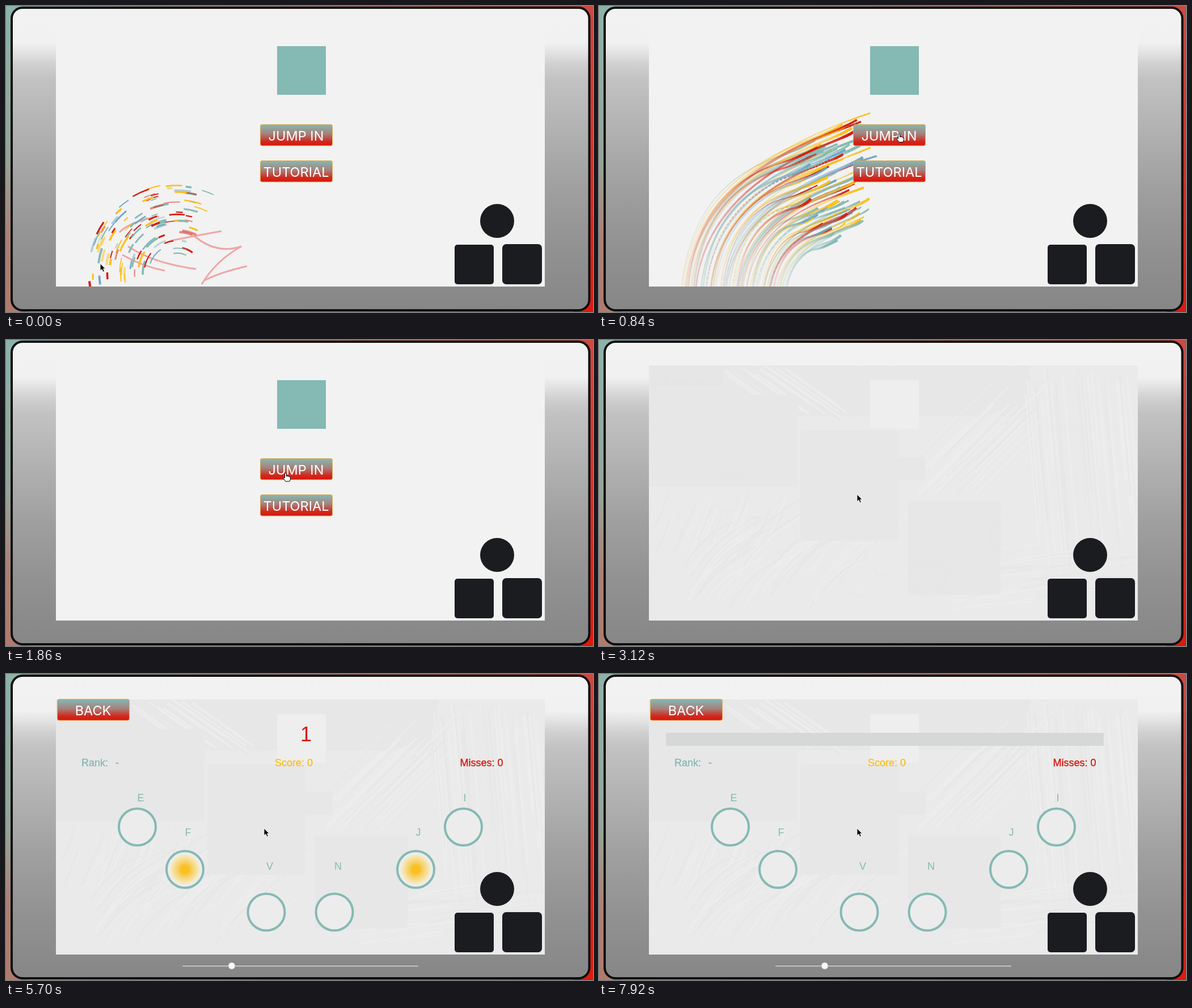
Recreate the animation shown at these times as an HTML page with a canvas. Size 1035 by 541 pixels, loop 8 s.

```html
<!DOCTYPE html>
<html lang="en">
<head>
<meta charset="utf-8">
<title>Rhythm game</title>
<style>
html, body { margin: 0; width: 100%; height: 100%; overflow: hidden; background: #888; }
canvas, svg { position: absolute; left: 0; top: 0; width: 1035px; height: 541px; display: block; }
text { font-family: "Liberation Sans", Arial, sans-serif; font-size: 18px; white-space: pre; }
.btn text { font-family: Inter, "Open Sans", sans-serif; font-size: 23.5px; fill: #fff; text-anchor: middle; }
.key { fill: #85b9b3; text-anchor: middle; }
.stat { stroke-width: .4px; }
#count { font-size: 36px; fill: #d41c10; text-anchor: middle; }
</style>
</head>
<body>
<canvas id="stage" width="1035" height="541"></canvas>
<svg viewBox="0 0 1035 541">
  <defs>
    <linearGradient id="btnFill" x1="0" y1="0" x2="0" y2="1">
      <stop offset="0" stop-color="#85b9b3"/>
      <stop offset=".45" stop-color="#a7807a"/>
      <stop offset=".8" stop-color="#d0281d"/>
      <stop offset="1" stop-color="#dc1608"/>
    </linearGradient>
    <radialGradient id="glowFill">
      <stop offset=".28" stop-color="#fbc01b"/>
      <stop offset=".36" stop-color="#f6c84a"/>
      <stop offset=".7" stop-color="#f6dd8e"/>
      <stop offset=".95" stop-color="#f5ebc8"/>
      <stop offset="1" stop-color="#f3eede" stop-opacity=".6"/>
    </radialGradient>
  </defs>
  <g id="menu">
    <rect x="478" y="71" width="86" height="86" fill="#85b9b3"/>
  </g>
  <g id="game">
    <rect id="bar" x="118" y="104" width="772" height="23" fill="#d6d8d7"/>
    <text class="stat" x="133" y="163" fill="#85b9b3" stroke="#85b9b3">Rank:</text>
    <text class="stat" x="193" y="163" fill="#85b9b3" stroke="#85b9b3">-</text>
    <text class="stat" x="474" y="163" fill="#fbc01b" stroke="#fbc01b">Score: 0</text>
    <text class="stat" x="800.5" y="163" fill="#d41c10" stroke="#d41c10">Misses: 0</text>
    <text id="count" x="529" y="118.5"></text>
    <rect x="311" y="514.5" width="416" height="3" rx="1.5" fill="#bcbcbc"/>
    <rect x="311" y="514" width="416" height="1" fill="#7b7b7b"/>
    <circle cx="398" cy="516" r="6" fill="#f8f8f8" stroke="#a5a5a5" stroke-width=".6"/>
  </g>
  <g fill="#1b1c1f">
    <circle cx="866" cy="380" r="30"/>
    <rect x="791" y="422" width="69" height="70" rx="5"/>
    <rect x="875" y="421" width="70" height="71" rx="7"/>
  </g>
  <g id="cursor">
    <path id="arrow" d="M0 0V12.5L3 9.8L5 14.5L7.3 13.5L5.3 9H9Z" fill="#000" stroke="#fff" stroke-width=".8"/>
    <path id="hand" d="M-1.5 1Q0-1 1.5 1V6Q3 4.5 4 6Q6 5 6.5 7Q8.5 6.500 8.500 8.500V11L7 15H0L-4.500 9Q-4 7-1.500 9Z" fill="#fff" stroke="#000" stroke-width="1"/>
  </g>
</svg>
<script>
const LOOP = 8000;
const RED = "#d41c10", TEAL = "#85b9b3", YELLOW = "#fbc01b", BLUE = "#6ba6c8";
const COLORS = [RED, TEAL, YELLOW, TEAL, BLUE, RED, TEAL, YELLOW];
const STAGE = { x: 88, y: 45, w: 862, h: 451 };
const $ = id => document.getElementById(id);
const ctx = $("stage").getContext("2d");
const clamp = v => Math.max(0, Math.min(1, v));
const ramp = (t, a, b) => clamp((t - a) / (b - a));
const mix = (a, b, k) => a + (b - a) * k;

function random(seed) {
  return () => {
    seed = (seed * 1664525 + 1013904223) >>> 0;
    return seed / 4294967296;
  };
}

function svg(parent, tag, attrs, text) {
  const el = document.createElementNS("http://www.w3.org/2000/svg", tag);
  for (const name in attrs) el.setAttribute(name, attrs[name]);
  if (text) el.textContent = text;
  return parent.appendChild(el);
}

function addButton(parent, x, y, label) {
  const g = svg(parent, "g", { class: "btn" });
  svg(g, "rect", { x: x + .5, y: y + .5, width: 127, height: 37.5, rx: 3, fill: "url(#btnFill)", stroke: "#e3a94a", "stroke-width": .9 });
  svg(g, "text", { x: x + 63.5, y: y + 29 }, label);
}
addButton($("menu"), 448, 209, "JUMP IN");
addButton($("menu"), 448, 273, "TUTORIAL");
addButton($("game"), 90, 44, "BACK");

// letter, ring centre, label position, place in the wave
const KEYS = [
  ["E", 231.5, 270.5, 237.5, 225, 0], ["I", 806.5, 270.5, 809, 225, 0],
  ["F", 315.5, 345.5, 321, 286, 1], ["J", 722.5, 345.5, 727, 286, 1],
  ["V", 459, 421, 465, 346, 2], ["N", 579, 421, 585.5, 346, 2]
];
const glows = KEYS.map(([letter, cx, cy, x, y, order]) => {
  svg($("game"), "circle", { cx, cy, r: 32.5, fill: "#ececec", stroke: TEAL, "stroke-width": 4 });
  svg($("game"), "text", { class: "key", x, y }, letter);
  const el = svg($("game"), "circle", { cx, cy, r: 27, fill: "url(#glowFill)" });
  return { el, order };
});

function makeBackdrop() {
  const cv = document.createElement("canvas");
  cv.width = 1035;
  cv.height = 541;
  const c = cv.getContext("2d");
  const fade = (x0, y0, x1, y1, stops) => {
    const g = c.createLinearGradient(x0, y0, x1, y1);
    stops.forEach(([at, color]) => g.addColorStop(at, color));
    return g;
  };
  c.fillStyle = fade(0, 0, 1035, 0, [[0, "#8db3a8"], [1, "#cb4a42"]]);
  c.fillRect(0, 0, 1035, 541);
  c.fillStyle = fade(0, 0, 0, 541, [[0, "#8db3a8"], [.5, "#94a598"], [.75, "#ab8175"], [1, "#b07a6c"]]);
  c.fillRect(0, 0, 40, 541);
  c.fillStyle = fade(0, 0, 0, 541, [[0, "#cb4a42"], [1, "#dc1a0c"]]);
  c.fillRect(1000, 0, 35, 541);
  c.beginPath();
  c.roundRect(10, 3, 1018.5, 535, 19);
  c.fillStyle = fade(0, 0, 0, 541, [
    [0, "#f2f2f2"], [.12, "#f1f1f1"], [.15, "#e4e4e4"], [.19, "#d0d0d0"], [.24, "#c2c2c2"],
    [.4, "#b2b2b2"], [.6, "#9f9f9f"], [.78, "#929292"], [1, "#868686"]
  ]);
  c.fill();
  c.lineWidth = 4;
  c.strokeStyle = "#0c0c0c";
  c.stroke();
  return cv;
}

// faint paper texture behind the game
function makePaper() {
  const cv = document.createElement("canvas");
  cv.width = STAGE.w;
  cv.height = STAGE.h;
  const c = cv.getContext("2d"), rnd = random(7);
  c.translate(-STAGE.x, -STAGE.y);
  c.fillStyle = "#eaeaea";
  c.fillRect(STAGE.x, STAGE.y, STAGE.w, STAGE.h);
  c.fillStyle = "#e7e7e7";
  c.fillRect(88, 45, 262, 215);
  c.fillRect(350, 45, 410, 90);
  const hatch = (n, x, y, w, h, dx, dy, bend) => {
    for (let i = 0; i < n; i++) {
      const px = x + rnd() * w, py = y + rnd() * h, k = .6 + rnd() * .6;
      c.beginPath();
      c.moveTo(px, py);
      c.quadraticCurveTo(px + dx * k / 2 + bend, py + dy * k / 2 + bend, px + dx * k, py + dy * k);
      c.strokeStyle = rnd() < .65 ? "#ededed" : "#e7e7e7";
      c.lineWidth = 1 + rnd() * 2.5;
      c.stroke();
    }
  };
  hatch(45, 750, 50, 190, 60, 25, 280, 0);
  hatch(45, 550, 190, 130, 90, 110, -110, 0);
  hatch(30, 220, 45, 110, 20, 100, 70, 0);
  hatch(40, 95, 330, 220, 60, 25, -60, 3);
  hatch(55, 150, 390, 300, 100, 110, -100, -16);
  hatch(25, 550, 380, 320, 100, 150, -20, -4);
  c.fillStyle = "#e7e7e7";
  c.fillRect(185, 97, 165, 163);
  c.fillRect(355, 160, 173, 195);
  c.fillRect(528, 208, 48, 40);
  c.fillRect(545, 285, 163, 165);
  c.fillStyle = "#eeeeee";
  c.fillRect(478, 71, 86, 86);
  return cv;
}
const backdrop = makeBackdrop(), paper = makePaper();

const rnd = random(42);
const streaks = Array.from({ length: 95 }, (_, i) => {
  const u = clamp((i * 37 % 95) / 94 + (rnd() - .5) * .06);
  const d = -95 + rnd() * 120, e = -95 + rnd() * 150;
  const a = [145 + 185 * u, 505];
  const c1 = [160 + 180 * u, 315 + 120 * u];
  const b = [395 + 45 * u + .85 * d, 222 + 175 * u - .5 * d];
  const c2 = [b[0] + (b[0] - c1[0]) * .4, b[1] + (b[1] - c1[1]) * .4];
  const c = [480 + 30 * u + e, 162 + 180 * u + rnd() * 24 - Math.min(0, e) * .3];
  const c3 = [c[0] + 22, c[1] + 12];
  const end = [mix(c[0], 510, .5) + rnd() * 30, mix(c[1], 250, .5) + rnd() * 30];
  return {
    curves: [[a, c1, b], [b, c2, c], [c, c3, end]],
    color: COLORS[Math.floor(rnd() * COLORS.length)],
    width: 2 + rnd() * 3.2,
    dotted: rnd() < .06
  };
});

const bezier = ([a, b, c], s) => [0, 1].map(i =>
  (1 - s) ** 2 * a[i] + 2 * s * (1 - s) * b[i] + s * s * c[i]);

function headAt(p, t) {
  if (t < 540) return bezier(p.curves[0], (t / 540) ** .9);
  if (t < 1260) return bezier(p.curves[1], (t - 540) / 720);
  return bezier(p.curves[2], ramp(t, 1260, 1740));
}

function drawStreaks(t) {
  const fade = 1 - ramp(t, 1400, 1860);
  if (!fade) return;
  const step = 30;
  for (const p of streaks) {
    ctx.strokeStyle = p.color;
    ctx.setLineDash(p.dotted ? [4, 3] : []);
    let from = Math.max(0, t - 1260), last = headAt(p, from);
    while (from < t) {
      const to = Math.min(t, from + step), next = headAt(p, to);
      const alpha = Math.min(1, 1.6 * Math.exp((from - t) / 320));
      ctx.globalAlpha = alpha * fade;
      ctx.lineWidth = p.width * (.55 + .45 * alpha);
      ctx.beginPath();
      ctx.moveTo(...last);
      ctx.lineTo(...next);
      ctx.stroke();
      last = next;
      from = to;
    }
  }
  ctx.setLineDash([]);
  ctx.globalAlpha = 1;
}

const WISPS = [
  [215, 425, 260, 455, 335, 465], [205, 440, 240, 460, 280, 468], [290, 415, 340, 405, 380, 398],
  [330, 405, 370, 440, 415, 425], [415, 425, 370, 450, 345, 492], [425, 460, 380, 470, 350, 485],
  [200, 400, 220, 380, 270, 372]
];

function drawSwirl(t) {
  const fade = Math.exp(-t / 130);
  if (fade < .02) return;
  const r = random(19), turn = t / 1500;
  ctx.lineWidth = 3;
  ctx.strokeStyle = "#f0a5a5";
  ctx.globalAlpha = fade;
  for (const [x, y, cx, cy, x2, y2] of WISPS) {
    ctx.beginPath();
    ctx.moveTo(x, y);
    ctx.quadraticCurveTo(cx, cy, x2, y2);
    ctx.stroke();
  }
  for (let i = 0; i < 110; i++) {
    const radius = 30 + 128 * Math.sqrt(r());
    const at = Math.PI * (.94 + r() * .66) + turn, len = (8 + r() * 24) / radius;
    ctx.strokeStyle = COLORS[Math.floor(r() * COLORS.length)];
    ctx.globalAlpha = fade * (r() < .3 ? .5 : 1);
    ctx.lineWidth = 1.5 + r() * 2.8;
    ctx.beginPath();
    ctx.arc(302, 472, radius, at, at + len);
    ctx.stroke();
  }
  ctx.globalAlpha = 1;
}

const PATH = [
  [0, 166, 456], [120, 185, 410], [300, 280, 315], [540, 432, 251], [800, 530, 222],
  [1000, 525, 240], [1260, 493, 235], [2460, 493, 235], [2580, 455, 273], [LOOP, 455, 273]
];

function moveCursor(t) {
  const i = PATH.findIndex(k => k[0] > t), a = PATH[i - 1], b = PATH[i];
  const s = ramp(t, a[0], b[0]), x = mix(a[1], b[1], s), y = mix(a[2], b[2], s);
  const over = t < 2340 && x > 448 && x < 576 && y > 209 && y < 247;
  $("cursor").setAttribute("transform", `translate(${x} ${y})`);
  $("arrow").style.display = over ? "none" : "";
  $("hand").style.display = over ? "" : "none";
}

const WAVES = [[3600, 780], [4440, 600], [5400, 780]];

function glowAt(t, order) {
  let level = 0;
  for (const [start, span] of WAVES) {
    const s = ((t - start) / span - order * .31) / .36;
    if (s > 0 && s < 1) level = Math.min(1, 1.6 * Math.sin(Math.PI * s));
  }
  return level;
}

function render(t) {
  const leave = ramp(t, 2040, 2340);
  ctx.drawImage(backdrop, 0, 0);
  ctx.save();
  ctx.beginPath();
  ctx.rect(STAGE.x, 6, STAGE.w, 490);
  ctx.clip();
  ctx.fillStyle = "#f2f2f2";
  ctx.fillRect(STAGE.x, STAGE.y, STAGE.w, STAGE.h);
  if (t < 2040) {
    drawSwirl(t);
    drawStreaks(t);
  }
  ctx.globalAlpha = leave;
  ctx.drawImage(paper, STAGE.x, STAGE.y);
  ctx.restore();

  $("menu").style.opacity = 1 - leave;
  $("game").style.opacity = ramp(t, 3120, 3420);
  $("bar").style.opacity = ramp(t, 6840, 7020);
  $("count").textContent = t < 3600 || t >= 6660 ? "" : t < 4560 ? "3" : t < 5580 ? "2" : "1";
  for (const g of glows) g.el.style.opacity = glowAt(t, g.order);
  moveCursor(t);
}

const begin = performance.now();
function tick() {
  render((performance.now() - begin) % LOOP);
  requestAnimationFrame(tick);
}
tick();
</script>
</body>
</html>
```
